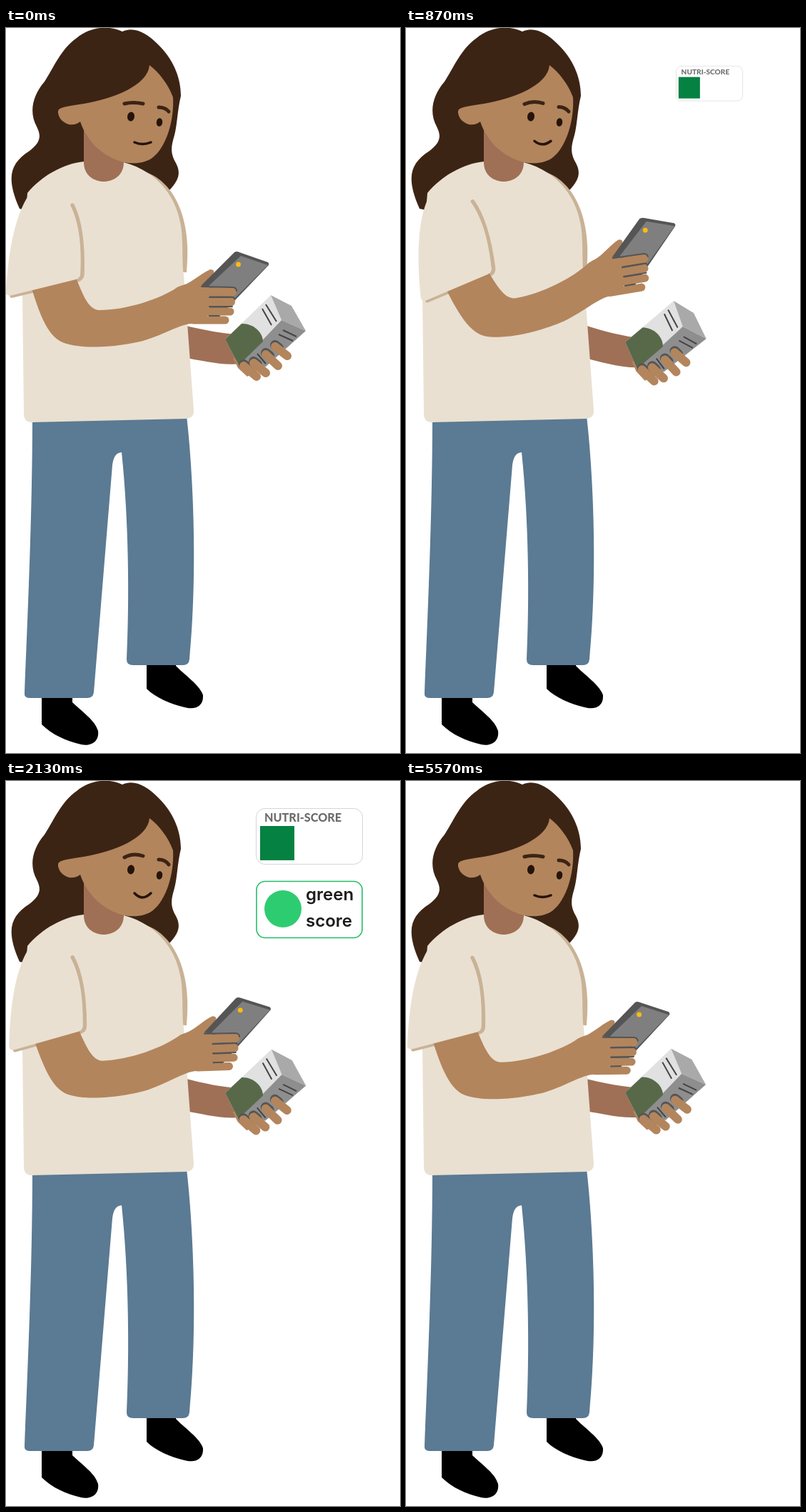
Recreate the animation shown at these times as an HTML page with a canvas. Size 552 by 1015 pixels, loop 5.6 s.

```html
<!DOCTYPE html>
<html lang="en">
<head>
<meta charset="utf-8">
<title>Scanning a product</title>
<style>
html, body { margin: 0; width: 100%; height: 100%; overflow: hidden; background: #fff; }
canvas { display: block; width: 552px; height: 1015px; }
</style>
</head>
<body>
<canvas id="stage"></canvas>
<script>
const W = 552, H = 1015, LOOP = 5600, STEP = 100 / 3;
const RISE_END = 870, REST = 2533, RESTART = 5530;
const SKIN = '#b3855d', SHADE = '#9f7055', HAIR = '#3c2415', SHIRT = '#e9e0d1',
      FOLD = '#c9b296', DENIM = '#5b7a93', INK = '#25140a', DARK = '#555';

const canvas = document.getElementById('stage');
const ctx = canvas.getContext('2d');
const dpr = window.devicePixelRatio || 1;
canvas.width = W * dpr;
canvas.height = H * dpr;

const clamp = x => Math.min(1, Math.max(0, x));
const smooth = x => (1 - Math.cos(Math.PI * clamp(x))) / 2;
const mix = (a, b, k) => a + (b - a) * k;

function fill(d, color) {
  ctx.fillStyle = color;
  ctx.fill(new Path2D(d));
}

function stroke(d, color, width, cap = 'round') {
  ctx.strokeStyle = color;
  ctx.lineWidth = width;
  ctx.lineCap = cap;
  ctx.lineJoin = 'round';
  ctx.stroke(new Path2D(d));
}

function turned(x, y, degrees, draw) {
  ctx.save();
  ctx.translate(x, y);
  ctx.rotate(degrees * Math.PI / 180);
  ctx.translate(-x, -y);
  draw();
  ctx.restore();
}

function scaled(x, y, k, draw) {
  if (k <= 0) return;
  ctx.save();
  ctx.translate(x, y);
  ctx.scale(k, k);
  ctx.translate(-x, -y);
  draw();
  ctx.restore();
}

// Quick rise with a soft landing, then a slower fall back to rest.
function lift(t) {
  if (t >= REST) return 0;
  const rising = t < RISE_END;
  const x = rising ? t / RISE_END : (t - RISE_END) / (REST - RISE_END);
  const s = x * x * (3 - 2 * x);
  return 1.1 * (rising ? s + x * (1 - x) ** 2 : 1 - s + 0.5 * x * x * (1 - x));
}

// Pop from nothing to an overshoot, then settle.
function pop(t, start) {
  const x = (t - start) / 200;
  return x < 1 ? 1.32 * smooth(x) : mix(1.32, 1, smooth(x - 1));
}

function legs() {
  fill('M50 936H93V944C110 960 125 970 129 984C131 1000 118 1006 105 1003C85 998 65 990 50 975Z', '#000');
  fill('M197 890H238V893C248 904 272 920 276 934C277 950 265 955 250 951C230 946 210 938 197 925Z', '#000');
  fill('M37 545L253 543C262 620 269 760 257 884Q256 892 248 892H178Q169 892 169 884' +
       'C173 800 172 690 162 594C155 595 151 598 149 612L123 930Q122 938 114 938H33Q25 938 26 930' +
       'C30 830 37 680 37 545Z', DENIM);
}

function farArm() {
  fill('M245 415C280 424 305 428 328 429L330 470C300 473 275 465 250 462Z', SHADE);
  fill('M318 462L340 462L352 480L338 488L325 476Z', SKIN);
  fill('M371 374L386 409L326 472L307 436Z', '#e1e1e1');
  fill('M371 374L400 389L420 424L386 409Z', '#a9a9a9');
  fill('M386 409L420 424L364 474L326 472Z', '#8e8e8e');
  fill('M307 436L330 414C346 413 360 426 360 439L326 472Z', '#58694a');
  stroke('M364 387L379 411M359 393L372 416M388 423L407 432M382 429L402 438', '#444', 2, 'butt');
  stroke('M352 456L364 470M358 454L368 466', '#444', 2, 'butt');
  for (const [x, y, tx, ty] of [[333, 473, 351, 488], [347, 469, 364, 483],
                                [364, 457, 381, 473], [377, 446, 394, 459]]) {
    stroke(`M${x} ${y - 2}l5 4`, DARK, 14);
    stroke(`M${x} ${y}L${tx} ${ty}`, SKIN, 12);
  }
}

function hairBack() {
  fill('M163 5C145 -4 118 -2 99 14C77 29 66 57 54 75C37 95 32 118 43 138' +
       'C50 152 48 160 33 172C5 190 0 210 19 253L100 270L228 228C243 213 245 202 238 189' +
       'C229 174 232 164 236 150C240 135 240 116 245 95C245 68 233 42 213 23C198 8 180 -3 163 5Z', HAIR);
}

function torso() {
  fill('M199 203C234 217 261 264 253 342L246 342L225 235Z', FOLD);
  fill('M109 187C80 190 50 207 30 231L24 300L23 374L25 540Q25 552 36 552L252 547' +
       'Q264 546 263 535L249 345C246 331 249 292 244 272C238 240 220 217 199 203C188 196 177 191 165 188Z', SHIRT);
}

function head(smile) {
  fill('M109 128V188C109 224 165 224 165 188L170 150Z', SHADE);
  fill('M201 52C214 62 227 78 234 97C236 130 224 167 206 181C196 189 180 191 165 188' +
       'C138 181 114 161 104 131C99 135 94 136 88 135C77 132 72 122 73 116' +
       'C75 110 91 109 109 106C151 99 199 80 201 52Z', SKIN);
  ctx.fillStyle = INK;
  for (const [x, y, rx, ry] of [[175, 124, 5, 6.5], [215, 132, 4.2, 5.8]]) {
    ctx.beginPath();
    ctx.ellipse(x, y, rx, ry, 0.12, 0, 2 * Math.PI);
    ctx.fill();
  }
  const s = smile;
  stroke(`M166 ${106 + s}Q178 ${mix(103, 100, s)} 192 ${mix(106, 105, s)}`, HAIR, 5);
  stroke(`M214 ${mix(111, 110, s)}Q223 ${mix(111, 110, s)} 228 117`, HAIR, 5);
  stroke(`M180 ${mix(160, 157, s)}Q191 ${mix(165, 169, s)} 203 ${mix(160, 157, s)}`, INK, 3.5);
}

function phoneHand() {
  fill('M240 363C260 358 270 345 286 338Q294 338 290 346L274 370Z', SKIN);
  fill('M320 314Q323 312 327 314L367 328Q370 331 366 334L299 404H284L272 362Z', DARK);
  fill('M329 319L367 332L321 378L284 361Z', '#7f7f7f');
  ctx.fillStyle = '#fdbb11';
  ctx.beginPath();
  ctx.arc(325.5, 331, 3.4, 0, 2 * Math.PI);
  ctx.fill();
  fill('M238 364L262 358L285 363V402L266 414L240 414Z', SKIN);
  for (const [x, y, tip, width] of [[272, 369.5, 317, 12], [268, 383.5, 315, 12],
                                    [268, 397, 314, 11], [263, 409, 307, 11]]) {
    stroke(`M${x} ${y}H${tip}`, SKIN, width);
  }
  stroke('M274 362L318 363Q323 364 323 368M285 377H319M285 390H317', DARK, 2);
  stroke('M284 403H299', DARK, 2, 'butt');
}

function nearArm(k) {
  const sleeve = draw => turned(61, 243, -8.3 * k, draw);
  sleeve(() => stroke('M93 248C106 274 108 310 107 344Q107 351 100 353L8 375', FOLD, 5.5));
  turned(41, 248, -8.6 * k, () => {
    fill('M30 345C45 395 56 430 79 440C110 452 165 445 192 438C225 428 245 413 268 413' +
         'L268 358Q252 357 240 363C215 380 168 395 130 395C114 393 108 374 92 335Z', SKIN);
    phoneHand();
  });
  sleeve(() => fill('M90 248L60 215L48 216C12 244 3 318 0 371Q1 376 9 374L98 352Q104 350 104 344' +
                    'C106 310 104 276 90 248Z', SHIRT));
}

function card(x, y, w, h, border, width) {
  ctx.beginPath();
  ctx.roundRect(x, y, w, h, 12);
  ctx.fillStyle = '#fff';
  ctx.fill();
  ctx.strokeStyle = border;
  ctx.lineWidth = width;
  ctx.stroke();
}

function label(text, x, y, font, color) {
  ctx.font = font;
  ctx.fillStyle = color;
  ctx.fillText(text, x, y);
}

function nutritionCard() {
  card(350.5, 38.5, 149, 78, '#d5d5d5', 1);
  label('NUTRI-SCORE', 362, 56.5, '800 16.2px Lato, sans-serif', '#6c6c6b');
  ctx.fillStyle = '#058142';
  ctx.fillRect(356, 63, 48, 48);
}

function greenCard() {
  card(351, 140.5, 148, 79, '#25bd68', 1.6);
  ctx.fillStyle = '#2ecc71';
  ctx.beginPath();
  ctx.arc(388, 179, 26, 0, 2 * Math.PI);
  ctx.fill();
  label('green', 420, 167, '600 24px Inter, sans-serif', '#1c1c1c');
  label('score', 420, 204, '600 24px Inter, sans-serif', '#1c1c1c');
}

function draw(time) {
  let t = Math.floor((time % LOOP + 4) / STEP) * STEP;
  if (t >= RESTART) t -= RESTART - STEP;
  const k = lift(t);

  ctx.setTransform(dpr, 0, 0, dpr, 0, 0);
  ctx.fillStyle = '#fff';
  ctx.fillRect(0, 0, W, H);
  legs();
  turned(250, 440, 3.4 * k, farArm);
  hairBack();
  torso();
  head(smooth((t - 700) / 300));
  nearArm(k);
  scaled(425, 78, pop(t, 770), nutritionCard);
  scaled(425, 180, pop(t, 1120), greenCard);
}

const start = performance.now();
function tick() {
  draw(performance.now() - start);
  requestAnimationFrame(tick);
}
tick();
</script>
</body>
</html>
```
